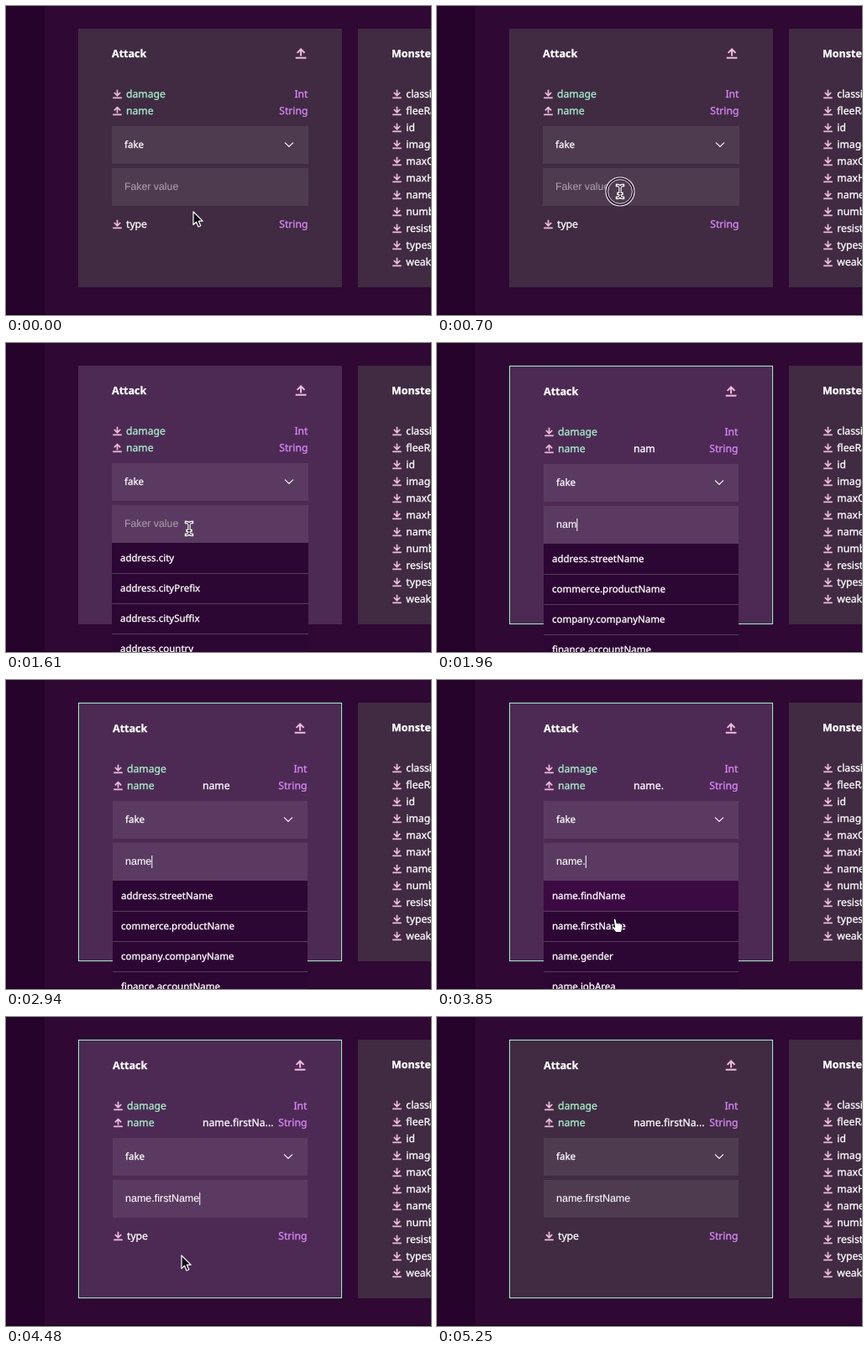
Write an HTML page that moves like this. It is 506 px wide and 368 px high and loops after 5390 ms.

```html
<!DOCTYPE html>
<html lang="en">
<head>
<meta charset="utf-8">
<title>Field faker</title>
<style>
  html, body { margin: 0; width: 100%; height: 100%; overflow: hidden; background: #2f0834; }
  svg { display: block; width: 506px; height: 368px; }
  text {
    font: 500 12.2px "Noto Sans", "Open Sans", sans-serif;
    color: #fff; fill: currentColor; stroke: currentColor; stroke-width: .3;
    text-rendering: geometricPrecision; white-space: pre;
  }
  .title { font-weight: 700; font-size: 12.5px; }
  .small { font-size: 11.5px; }
  .input { font: 400 12.5px "Liberation Sans", Arial, sans-serif; stroke-width: .1; }
  .hint { font-size: 12.3px; color: #ab9bad; }
  .green { color: #a6f2cc; }
  .type { color: #d987f8; text-anchor: end; }
  .icon { fill: none; stroke: #f0bbdc; stroke-width: 1.7; }
  .card { fill: #402b42; }
  .field { fill: #fff; fill-opacity: .075; }
</style>
</head>
<body>
<svg id="stage" viewBox="0 0 506 368"></svg>
<script>
const LOOP = 5390, STEP = 70;
const stage = document.getElementById('stage');

function add(parent, tag, attrs = {}, content = '') {
  const el = document.createElementNS('http://www.w3.org/2000/svg', tag);
  set(el, attrs);
  el.textContent = content;
  parent.appendChild(el);
  return el;
}
function set(el, attrs) {
  for (const key in attrs) el.setAttribute(key, attrs[key]);
}
const group = (parent = stage) => add(parent, 'g');
const rect = (parent, x, y, width, height, attrs) =>
  add(parent, 'rect', { x, y, width, height, ...attrs });
const label = (parent, x, y, content, cls = '') =>
  add(parent, 'text', { x, y, class: cls }, content);
const path = (parent, d, attrs) => add(parent, 'path', { d, ...attrs });
const show = (el, on) => set(el, { visibility: on ? 'visible' : 'hidden' });

function icon(parent, x, y, up, scale = 1) {
  const arrow = up ? 'M5.5 8V1.2M1.8 4.9L5.5 1.2L9.2 4.9' : 'M5.5 .3V7M1.8 3.5L5.5 7.2L9.2 3.5';
  path(parent, arrow + 'M.2 9.8H10.8', {
    class: 'icon', transform: `translate(${x} ${y}) scale(${scale})`
  });
}

// Page and cards
rect(stage, 0, 0, 506, 368, { fill: '#2f0834' });
rect(stage, 0, 0, 46, 368, { fill: '#25032a' });
rect(stage, 0, 367, 506, 1, { fill: '#1c031f' });
rect(stage, 86, 27, 314, 308, { class: 'card' });
rect(stage, 419, 27, 90, 308, { class: 'card' });
const glow = rect(stage, 86, 27, 314, 308, { fill: '#4d2a54' });
const border = group();
rect(border, 86.5, 27.5, 313, 307, { fill: 'none', stroke: '#1d0524', 'stroke-width': 3, 'stroke-opacity': .5 });
rect(border, 86.5, 27.5, 313, 307, { fill: 'none', stroke: '#a3e6c9', 'stroke-width': 1.2 });

label(stage, 459, 61, 'Monster', 'title');
['classification', 'fleeRate', 'id', 'image', 'maxCP', 'maxHP', 'name', 'number', 'resistant', 'types', 'weaknesses']
  .forEach((name, i) => {
    icon(stage, 460, 99.5 + i * 20, false);
    label(stage, 476.3, 109 + i * 20, name);
  });

// Contents of the first card: the border pushes both sides inwards.
// The left group holds the suggestions, so it lies on top.
const right = group(), left = group();
label(left, 126, 60.5, 'Attack', 'title');
icon(left, 127, 99.5, false);
label(left, 143, 109, 'damage', 'green');
icon(left, 127, 119.5, true);
label(left, 143, 129, 'name', 'green');
icon(left, 127, 254.5, false);
label(left, 143, 264, 'type');
icon(right, 344.5, 50, true, 1.2);
label(right, 359.5, 109, 'Int', 'type');
label(right, 359.5, 129, 'String', 'type');
label(right, 359.5, 264, 'String', 'type');

const fields = [143, 193].map(y => rect(left, 126, y, 234, 45, { class: 'field' }));
label(left, 141, 169, 'fake', 'small');
path(left, 'M332 162.7L337 167.4L342 162.7', { fill: 'none', stroke: '#fff', 'stroke-width': 1.1 });
const chevron = left.lastChild;
right.appendChild(chevron);
left.before(right);
const hint = label(left, 141, 219.3, 'Faker value', 'input hint');
const typed = label(left, 141, 219.3, '', 'input');
const caret = rect(left, 141, 208, 1, 15, { fill: '#fff' });
const preview = label(stage, 234, 130, '');

// Suggestions
const list = group(left);
const rows = [0, 1, 2, 3].map(i => ({
  bg: rect(list, 126, 238 + i * 36, 234, 36),
  text: label(list, 136, 260 + i * 36, '', 'small')
}));
const lines = [274, 310, 346].map(y => rect(list, 126, y, 234, 1, { fill: '#573d5a' }));
const lists = {
  '': ['address.city', 'address.cityPrefix', 'address.citySuffix', 'address.country'],
  'n': ['address.country', 'address.countryCode', 'address.county', 'address.direction'],
  'na': ['address.streetName', 'commerce.productName', 'company.companyName', 'finance.accountName'],
  'name.': ['name.findName', 'name.firstName', 'name.gender', 'name.jobArea']
};
lists.nam = lists.name = lists.na;

// Pointer
const ring = group();
add(ring, 'circle', { r: 17, fill: 'none', stroke: '#f3eaf3', 'stroke-width': 1.2 });
add(ring, 'circle', { r: 15.6, fill: 'none', stroke: '#1d101e', 'stroke-width': 1.4 });
add(ring, 'circle', { r: 14.4, fill: 'none', stroke: '#d9cbd9', 'stroke-width': 1 });
const pointer = group();
const arrow = path(pointer, 'M0 0V15.5L3.6 12.2L6 18L8.8 16.8L6.4 11.2H11.2Z',
  { fill: '#120a14', stroke: '#fff', 'stroke-width': 1.2, 'stroke-linejoin': 'round' });
const beam = group(pointer);
const beamShape = 'M-3.5 -7.5Q0 -7.5 0 -5Q0 -7.5 3.5 -7.5M0 -6V6M-3.5 7.5Q0 7.5 0 5Q0 7.5 3.5 7.5M-2 2.5H2';
path(beam, beamShape, { fill: 'none', stroke: '#fff', 'stroke-width': 3.4, 'stroke-linecap': 'square' });
path(beam, beamShape, { fill: 'none', stroke: '#1a0f1c', 'stroke-width': 1 });
const hand = path(pointer,
  'M1.2 1.3Q2.6 -.6 4 1.3L5.2 6Q6.4 4.8 7.6 6Q8.8 5 9.8 6.6Q11.4 6 11.8 8L11.6 12L10.4 16.5H4L-.8 10.8Q-1.6 8.6 .6 9.2L2.6 10.6Z',
  { fill: '#fff', stroke: '#150b17', 'stroke-width': 1, 'stroke-linejoin': 'round' });

// Timeline
const values = [[0, ''], [1680, 'n'], [1820, 'na'], [1960, 'nam'], [2100, 'name'], [3080, 'name.'], [4200, 'name.firstName']];
const caretOn = [[840, 1365], [1680, 2450], [2940, 3500], [3780, 4760]];
const pointerOn = [[0, 1680], [3500, 4830]];
const clicks = [[630, 218, 221], [4060, 211, 286]];

const within = (t, spans) => spans.some(([a, b]) => t >= a && t < b);
const ramp = (t, a, b) => Math.min(1, Math.max(0, (t - a) / (b - a)));
const ease = p => p * p * (3 - 2 * p);
const mix = (a, b, p) => a + (b - a) * p;

function drawPointer(t) {
  const late = t >= 3500;
  const p = late ? ease(ramp(t, 3500, 3780)) : ease(ramp(t, 70, 490));
  const x = late ? mix(218, 209, p) : mix(223, 218, p);
  const y = late ? mix(221, 284, p) : mix(245, 221, p);
  const overField = y < 238;
  const overList = late && !overField && t < 4200;
  const on = within(t, pointerOn);
  set(pointer, { transform: `translate(${x} ${y})` });
  show(beam, on && overField);
  show(hand, on && overList);
  show(arrow, on && !overField && !overList);

  const click = clicks.find(([start]) => t >= start && t < start + 350);
  show(ring, !!click);
  if (click) {
    const [start, cx, cy] = click;
    const size = mix(.7, 1, ramp(t, start, start + 70));
    set(ring, {
      transform: `translate(${cx} ${cy}) scale(${size})`,
      opacity: 1 - ramp(t, start + 70, start + 350)
    });
  }
}

function drawList(t, value) {
  const open = t >= 840 && t < 4200;
  set(list, { display: open ? 'inline' : 'none' });
  if (!open) return;
  const active = t >= 4060 ? 1 : t >= 3640 ? 0 : -1;
  rows.forEach(({ bg, text }, i) => {
    set(bg, { fill: i === active ? '#3c0a42' : '#2d0733' });
    text.textContent = lists[value][i];
  });
}

function draw(t) {
  const value = values.filter(([start]) => t >= start).pop()[1];
  const shift = value ? 1 : 0;
  set(left, { transform: `translate(${shift} ${shift})` });
  set(right, { transform: `translate(${-shift} ${shift})` });
  [...fields, ...lines, ...rows.map(r => r.bg)].forEach(el => set(el, { width: 234 - 2 * shift }));
  show(border, shift);
  show(hint, !shift);
  set(glow, { opacity: ramp(t, 1470, 1610) * (1 - ramp(t, 4690, 5040)) });

  typed.textContent = value;
  preview.textContent = value.length > 12 ? value.slice(0, 12) + '...' : value;
  set(caret, { x: 141 + (value ? typed.getComputedTextLength() : -1) });
  show(caret, within(t, caretOn));

  drawList(t, value);
  drawPointer(t);
}

const begin = performance.now();
function tick() {
  const t = (performance.now() - begin) % LOOP;
  draw(Math.floor(t / STEP) * STEP);
  requestAnimationFrame(tick);
}
tick();
</script>
</body>
</html>
```
